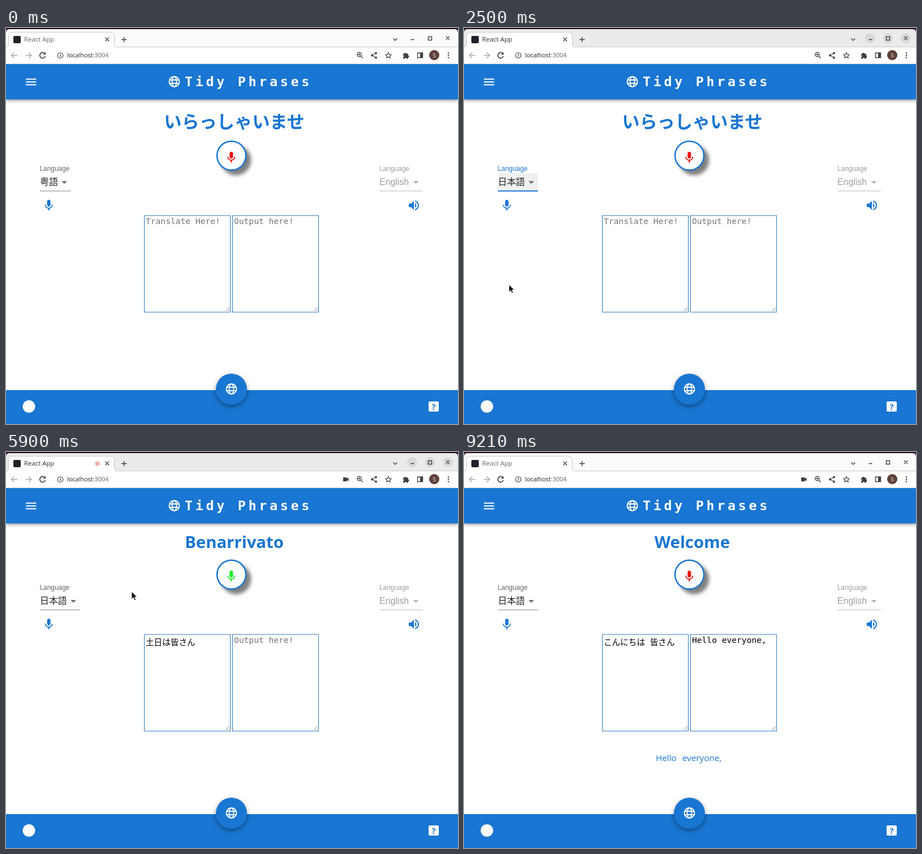
Animation, 799 px wide and 701 px high, one loop 9290 ms. Source, as an HTML page:

```html
<!DOCTYPE html>
<html lang="ja">
<head>
<meta charset="utf-8">
<title>Tidy Phrases</title>
<style>
html, body { margin: 0; width: 100%; height: 100%; overflow: hidden; background: #fff; }
svg { display: block; width: 100%; height: 100%; }
text { white-space: pre; }
.ui { font-family: "Open Sans", "Noto Sans", sans-serif; }
.form { font: 15.9px "Liberation Sans", "Noto Sans CJK JP", sans-serif; }
.label { font-size: 11.9px; }
.mono { font: 14.6px "DejaVu Sans Mono", "Noto Sans CJK JP", monospace; }
.brand { font: bold 23.3px "DejaVu Sans Mono", monospace; letter-spacing: 4.73px; }
.head { font: bold 29.3px "Open Sans", "Noto Sans CJK JP", sans-serif; }
.line { fill: none; stroke: #3c4043; stroke-width: 1.4; }
.bar { filter: drop-shadow(0 2px 3px rgba(0,0,0,.4)); }
.fab { filter: drop-shadow(0 3px 4px rgba(0,0,0,.4)); }
.deep { filter: drop-shadow(8px 8px 3px rgba(0,0,0,.5)); }
.paper { filter: drop-shadow(0 4px 5px rgba(0,0,0,.4)); }
#menu { transform-origin: 87px 290px; }
</style>
</head>
<body>
<svg viewBox="0 0 799 701" preserveAspectRatio="none">
<defs>
  <path id="mic" d="M12 14c1.66 0 2.99-1.34 2.99-3L15 5c0-1.66-1.34-3-3-3S9 3.34 9 5v6c0 1.66 1.34 3 3 3zm5.3-3c0 3-2.54 5.1-5.3 5.1S6.7 14 6.7 11H5c0 3.41 2.72 6.23 6 6.72V21h2v-3.28c3.28-.48 6-3.3 6-6.72h-1.7z"/>
  <g id="globe" fill="none" stroke="#fff" stroke-width="1.9">
    <circle r="9"/><ellipse rx="4" ry="9"/><path d="M-8.4-3H8.4M-8.4 3H8.4"/>
  </g>
  <path id="caret" d="M-5-2.5L0 2.5L5-2.5z"/>
  <g id="area">
    <rect x=".5" y=".5" width="152" height="171" fill="#fff" stroke="#2a78bd"/>
    <path d="M144.500 169.500l6-6M148.500 169.500l2-2" stroke="#777" fill="none"/>
  </g>
</defs>

<!-- browser window -->
<rect width="799" height="20" fill="#2c0a1e"/>
<path id="strip" d="M0 33V8Q0 2 6 2H793Q799 2 799 8V33z"/>
<rect y="33" width="799" height="31" fill="#fff"/>
<path d="M0 33.500H799" stroke="#c8c8c8"/>
<path d="M-1 34.500Q4.500 33 4.500 28V14Q4.500 7.500 11 7.500H184Q191.500 7.500 191.500 14V28Q191.500 33 197 34.500z" fill="#fff" stroke="#c8c8c8"/>
<rect y="34" width="799" height="29" fill="#fff"/>
<path d="M0 63.500H799" stroke="#dcdcdc"/>
<rect x="13" y="14" width="13" height="13" rx="2" fill="#20232a"/>
<text id="tab" class="ui" x="32" y="24" font-size="11.4">React App</text>
<g id="dot" fill="#d93025"><circle cx="161.500" cy="20.500" r="3.300"/><circle cx="161.500" cy="20.500" r="4.500" fill="none" stroke="#d93025" stroke-width=".8"/></g>
<g id="knobs" fill="#dadada"><circle cx="718" cy="18" r="9"/><circle cx="749.500" cy="18" r="9"/><circle cx="781" cy="18" r="9"/></g>
<path class="line" d="M175.500 17l6.500 6.500M182 17l-6.500 6.500M204 20.500h9.500M208.700 16v9M684.500 18.500l3.500 3.500l3.500-3.500"/>
<path class="line" stroke-width="1" d="M715.500 20.500h6M746.500 15.500h6v6h-6zM778 15l6 6M784 15l-6 6"/>
<g class="line">
  <path d="M20 48.500H9.500M14.500 43.500l-5 5l5 5M34.500 48.500H45M40 43.500l5 5l-5 5" stroke="#a5a7aa"/>
  <path d="M68.500 45a5 5 0 1 0 1 5" stroke-width="1.700"/><path d="M70 42.500v4.500h-4.500z" fill="#3c4043" stroke="none"/>
  <circle cx="96" cy="48.500" r="4.800" stroke-width="1.100"/><path d="M96 47.500v3.500M96 45.500v1.200"/>
  <circle cx="624.500" cy="47" r="3.700"/><path d="M627.500 50l3.200 3.200M622.700 47h3.600M624.500 45.200v3.600"/>
  <path d="M654 44.500l-7 4l7 4" stroke-width="1.200"/>
  <path d="M676 43.500l1.500 3.300l3.600.4l-2.700 2.400l.8 3.500l-3.200-1.800l-3.200 1.800l.8-3.500l-2.700-2.400l3.600-.4z" stroke-width="1.200"/>
  <path d="M727.500 44h9v8.500h-9z"/>
</g>
<g fill="#3c4043">
  <circle cx="654" cy="44.500" r="1.900"/><circle cx="647" cy="48.500" r="1.900"/><circle cx="654" cy="52.500" r="1.900"/>
  <path d="M702 45.500h2.500a1.700 1.700 0 1 1 3.400 0h3v3a1.700 1.700 0 1 1 0 3.400v2.300h-3a1.500 1.500 0 0 0-3 0H702v-3a1.500 1.500 0 0 0 0-3zM732 44h4.500v8.500H732z"/>
  <circle cx="782" cy="44.500" r="1.200"/><circle cx="782" cy="48.500" r="1.200"/><circle cx="782" cy="52.500" r="1.200"/>
  <path id="cam" d="M596 45h6.500v2.300l3-2v6.400l-3-2V52H596z"/>
</g>
<circle cx="757" cy="48" r="9" fill="#5d4037"/>
<text class="ui" x="757" y="51.500" font-size="9.500" fill="#fff" text-anchor="middle">S</text>
<text class="ui" x="108" y="52" font-size="10.900" fill="#202124">localhost<tspan fill="#5f6368">:3004</tspan></text>

<!-- page -->
<rect y="64" width="799" height="637" fill="#fff"/>
<rect class="bar" y="64" width="799" height="62.500" fill="#1976d2"/>
<rect y="58" width="799" height="5" fill="#fff"/>
<path d="M35 90.500H53.500M35 95.500H53.500M35 100.500H53.500" stroke="#fff" stroke-width="2"/>
<use href="#globe" x="297.500" y="95"/>
<text class="brand" x="316" y="103" fill="#fff">Tidy Phrases</text>
<text id="head" class="head" x="403.500" fill="#1976d2" text-anchor="middle"></text>

<rect y="641" width="799" height="60" fill="#1976d2"/>
<circle class="fab" cx="398.500" cy="639.500" r="27.500" fill="#1976d2"/>
<use href="#globe" x="398.500" y="639"/>
<circle cx="40.500" cy="670" r="11" fill="#fff"/>
<rect x="747" y="661" width="18" height="18" rx="2" fill="#fff"/>
<text class="ui" x="756" y="675.500" font-size="15" font-weight="bold" fill="#1976d2" text-anchor="middle">?</text>

<g id="body">
  <circle class="deep" cx="398.500" cy="226" r="25.500" fill="#fff" stroke="#1976d2" stroke-width="2.500"/>
  <use id="live" href="#mic" x="386.300" y="217"/>

  <rect id="tint" x="60" y="257" width="71" height="31" fill="#f0f0f0"/>
  <text id="label" class="form label" x="59.500" y="253">Language</text>
  <text id="lang" class="form" x="60" y="278" fill="#212121"></text>
  <use id="arrow" href="#caret" fill="#757575"/>
  <path id="under"/>
  <use href="#mic" x="63.700" y="302" fill="#1976d2"/>

  <g fill="#9e9e9e">
    <text class="form label" x="660" y="253">Language</text>
    <text class="form" x="660" y="278">English</text>
    <use href="#caret" x="724.500" y="273.500" fill="#b5b5b5"/>
    <path d="M660 288.500H737" stroke="#bdbdbd"/>
  </g>
  <path transform="translate(709 302)" fill="#1976d2" d="M3 9v6h4l5 5V4L7 9H3zm13.500 3c0-1.770-1.020-3.290-2.500-4.030v8.050c1.480-.73 2.500-2.250 2.500-4.020zM14 3.230v2.060c2.890.86 5 3.540 5 6.710s-2.110 5.850-5 6.710v2.060c4.010-.91 7-4.490 7-8.770s-2.990-7.860-7-8.770z"/>

  <use href="#area" x="244" y="331.500"/>
  <use href="#area" x="400" y="331.500"/>
  <text id="input" class="mono" x="247"></text>
  <text id="output" class="mono" x="403" y="347"></text>
  <text id="result" class="ui" x="339" y="556" font-size="15.300" fill="#1976d2" word-spacing="6">Hello everyone,</text>

  <g id="menu">
    <rect class="paper" x="41" y="289.500" width="92.500" height="331" rx="4" fill="#fff"/>
    <rect x="41" y="296.500" width="92.500" height="35" fill="#d1e4f6"/>
    <rect id="hover" x="41" width="92.500" height="35" fill="#f5f5f5"/>
  </g>
</g>

<path id="arrowPtr" d="M0 0V13.500L3.200 10.700L5.300 15.500L7.700 14.500L5.600 9.800H9.800z" fill="#111" stroke="#fff" stroke-width=".9"/>
<path id="handPtr" d="M-1.500 0Q0-1.500 1.200 0V5L7 6.200Q8.500 6.700 8.300 8.500L7.300 14H0L-4.500 8.500Q-4.800 6.500-3 7L-1.500 8.300z" fill="#222" stroke="#fff" stroke-width=".9"/>
</svg>
<script>
const LOOP = 9290, STEP = 80, BLUE = '#1976d2';
const $ = id => document.getElementById(id);
const set = (id, attrs) => { for (const k in attrs) $(id).setAttribute(k, attrs[k]); };
const show = (id, on) => set(id, { visibility: on ? 'visible' : 'hidden' });
const write = (id, s) => { if ($(id).textContent !== s) $(id).textContent = s; };
const clamp = v => Math.min(1, Math.max(0, v));
const ease = v => v * v * (3 - 2 * v);
const within = (t, a, b) => t >= a && t < b;
const latest = (list, t) => list.filter(e => t >= e[0]).pop()[1];

const ROW = 35.15;
const langs = ['粤語', 'Español', 'Français', 'Deutsch', 'Italiano', '日本語', '한국어', '普通话', 'русский'];
langs.forEach((name, i) => {
  const el = document.createElementNS('http://www.w3.org/2000/svg', 'text');
  el.setAttribute('class', 'form');
  el.setAttribute('x', 57);
  el.setAttribute('y', 319 + i * ROW);
  el.setAttribute('fill', '#212121');
  el.textContent = name;
  $('menu').append(el);
});

const greetings = [[0, 'いらっしゃいませ'], [2900, 'Bienvenue'], [5900, 'Benarrivato'], [9210, 'Welcome']];
const speech = [[0, ''], [4890, '土日は'], [5440, '土日は皆'], [5670, '土日は皆さん'], [6620, 'こんにちは 皆さん']];
// time, x, y of the pointer
const path = [
  [420, 381, 213], [980, 62, 273], [1300, 62, 273], [1860, 67, 478], [2340, 67, 478],
  [3060, 165, 288], [3380, 75, 299], [3700, 75, 299], [4180, 215, 248], [4260, 222, 247],
  [8110, 222, 247], [8350, 450, 281], [8630, 734, 194]
];

function pointer(t) {
  const s = Math.floor((t - 20) / STEP) * STEP + 20;
  const i = path.findIndex(p => p[0] > s);
  if (i < 1) return path[i < 0 ? path.length - 1 : 0].slice(1);
  const [a, b] = [path[i - 1], path[i]];
  const k = ease((s - a[0]) / (b[0] - a[0]));
  return [a[1] + (b[1] - a[1]) * k, a[2] + (b[2] - a[2]) * k];
}

function drawBrowser(t) {
  const active = within(t, 1140, 9210);
  set('strip', { fill: active ? '#ebebeb' : '#fbfbfb' });
  set('tab', { fill: active ? '#303030' : '#686868' });
  show('knobs', active);
  show('cam', t >= 3620);
  show('dot', within(t, 3620, 7500));
  set('dot', { opacity: 0.35 + 0.65 * (0.5 - 0.5 * Math.cos((t - 5800) * Math.PI / 500)) });
}

function drawSelect(t, y) {
  const open = within(t, 1140, 2180), picked = t >= 2260;
  const focus = within(t, 1140, 3540), over = within(t, 900, 1140);
  const right = picked ? 131 : 115;
  write('lang', picked ? langs[5] : langs[0]);
  set('label', { fill: focus ? BLUE : '#666' });
  set('arrow', { transform: `translate(${right - 12} 273.5) scale(1 ${open ? -1 : 1})` });
  set('under', {
    d: `M60 288.500H${right}`,
    stroke: focus ? BLUE : over ? '#212121' : '#888',
    'stroke-width': focus || over ? 2 : 1
  });
  show('tint', within(t, 2260, 3540));

  const k = ease(clamp((t - 1140) / 240)) * (1 - ease(clamp((t - 2180) / 240)));
  show('menu', k > 0);
  const size = t < 2180 ? 0.75 + 0.25 * k : 1;
  set('menu', { opacity: k, style: `transform: scale(${size}, ${size * size})` });
  const row = Math.floor((y + 7 - 296.500) / ROW);
  set('hover', { y: 296.500 + row * ROW, opacity: row > 0 && row < 9 ? 1 : 0 });
}

function draw(t) {
  const [x, y] = pointer(t);
  drawBrowser(t);
  drawSelect(t, y);

  write('head', latest(greetings, t));
  set('head', t < 2900 ? { y: 177, 'font-size': 31.3, style: 'font-size:31.2px' } : { y: 170, style: '' });
  set('body', { transform: `translate(0 ${t < 2900 ? 0 : -9})` });
  set('live', { fill: within(t, 3620, 6620) ? '#0cf01c' : '#f40a0a' });

  const said = latest(speech, t), done = t >= 6780;
  write('input', said || 'Translate Here!');
  set('input', { y: said ? 351 : 347, fill: said ? '#000' : '#757575' });
  write('output', done ? 'Hello everyone,' : 'Output here!');
  set('output', { fill: done ? '#000' : '#757575' });
  show('result', done);

  const hand = within(t, 860, 2500) || within(t, 3300, 3780);
  const seen = within(t, 420, 8630);
  const place = { transform: `translate(${x} ${y})` };
  set('arrowPtr', place);
  set('handPtr', place);
  show('arrowPtr', seen && !hand);
  show('handPtr', seen && hand);
}

const start = performance.now();
function tick() {
  draw((performance.now() - start) % LOOP);
  requestAnimationFrame(tick);
}
tick();
</script>
</body>
</html>
```
